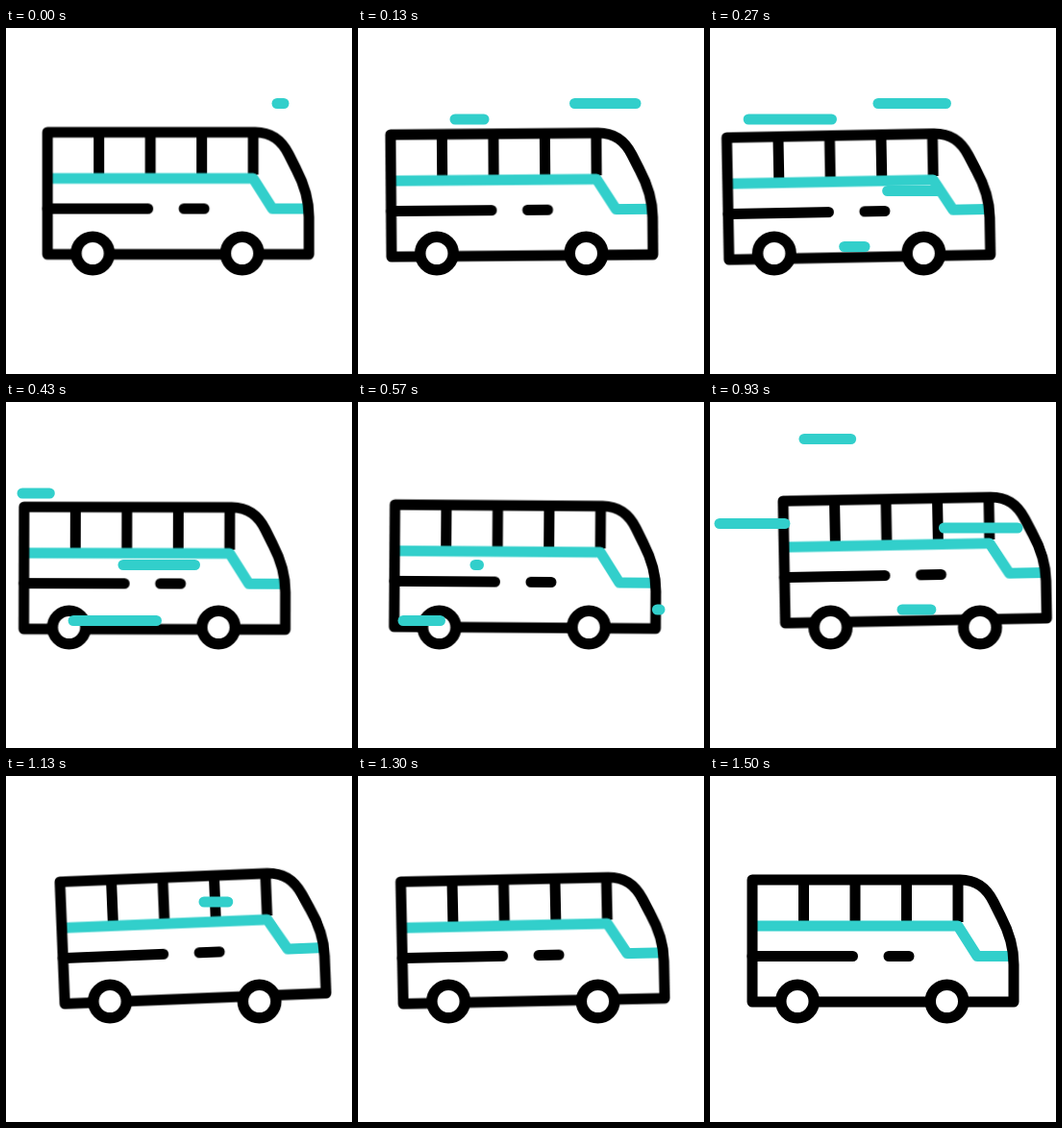
Recreate the animation shown at these times as an HTML page. Size 360 by 360 pixels, loop 1.67 s.

```html
<!DOCTYPE html>
<html lang="en">
<head>
<meta charset="utf-8">
<title>Bus</title>
<style>
  html, body { margin: 0; width: 100%; height: 100%; overflow: hidden; background: #fff; }
  svg { display: block; width: 100vw; height: 100vh; }
  svg * { animation-duration: 1670ms; animation-iteration-count: infinite; }

  :root {
    --smooth: cubic-bezier(.333, 0, .667, 1);
    --in: cubic-bezier(.4, 0, .7, .7);
    --out: cubic-bezier(.3, .3, .6, 1);
  }

  .line { fill: none; stroke: #000; stroke-width: 11; stroke-linecap: round; stroke-linejoin: round; }
  .teal { stroke: #32cfcb; }
  .butt { stroke-linecap: butt; }
  .wheel { fill: #fff; stroke: #000; stroke-width: 11.5; }

  .drive { animation-name: drive; animation-timing-function: var(--smooth); }
  @keyframes drive {
    0% { transform: translateX(-.8px); }
    21.6% { transform: translateX(-28.5px); }
    53.3% { transform: translateX(35px); animation-timing-function: cubic-bezier(.33, 0, .5, 1); }
    85.9%, 100% { transform: translateX(0); }
  }

  .bounce { animation-name: bounce; animation-timing-function: var(--smooth); }
  @keyframes bounce {
    0% { transform: translateY(.5px); }
    16.2% { transform: translateY(3.5px); }
    34.1% { transform: translateY(-.2px); }
    46.1% { transform: translateY(3.5px); }
    55.7% { transform: translateY(-7.5px); animation-timing-function: var(--in); }
    67.7% { transform: translateY(-3.5px); animation-timing-function: var(--out); }
    89.8%, 100% { transform: translateY(0); }
  }

  .tilt { transform-origin: 180px 235px; animation-name: tilt; animation-timing-function: var(--smooth); }
  @keyframes tilt {
    0% { transform: rotate(0deg); }
    17% { transform: rotate(-1.08deg); animation-timing-function: var(--in); }
    34.1% { transform: rotate(.4deg); animation-timing-function: var(--out); }
    46.1% { transform: rotate(1.47deg); animation-timing-function: var(--in); }
    55.7% { transform: rotate(-1.06deg); animation-timing-function: var(--out); }
    66.5% { transform: rotate(-2.35deg); }
    89.8%, 100% { transform: rotate(0deg); }
  }

  /* Each streak grows from its right end, then its tail catches up. */
  .wind path {
    animation-name: streak;
    animation-timing-function: linear;
    animation-delay: calc(var(--t) * 1ms - 1670ms);
  }
  @keyframes streak {
    0% { stroke-dasharray: 0px 300px; stroke-dashoffset: 0px; opacity: 1; }
    11.98% { stroke-dasharray: 87px 300px; stroke-dashoffset: 0px; }
    15.69% { stroke-dasharray: 82.6px 300px; stroke-dashoffset: -31.4px; }
    25.44% { stroke-dasharray: 0px 300px; stroke-dashoffset: -114px; opacity: 1; }
    25.45%, 100% { stroke-dasharray: 0px 300px; stroke-dashoffset: -114px; opacity: 0; }
  }

  .wind { animation-name: calm; animation-timing-function: step-end; }
  @keyframes calm {
    0% { opacity: 1; }
    90%, 100% { opacity: 0; }
  }
</style>
</head>
<body>
<svg viewBox="0 0 360 360">
  <g class="drive">
    <g class="bounce">
      <g class="tilt">
        <path class="line butt" d="M97.5 108V152M151 108V152M204.5 108V152M258 108V152"/>
        <path class="line teal butt" d="M46 156H258L278 187.5H314"/>
        <path class="line" d="M44 187.5H148.5M186 187.5H207"/>
        <path class="line" d="M44 108H260C278 108 288 117 295 131L303 147C312 164 316 180 316 196V235H44Z"/>
      </g>
    </g>
    <circle class="wheel" cx="91" cy="234.5" r="17.25"/>
    <circle class="wheel" cx="246.5" cy="234.5" r="17.25"/>
  </g>
  <g class="wind">
    <path class="line teal" d="M289 78.5h-114" style="--t:-15"/>
    <path class="line teal" d="M131 95h-114" style="--t:62"/>
    <path class="line teal" d="M236 169.5h-114" style="--t:153"/>
    <path class="line teal" d="M161 227.5h-114" style="--t:222"/>
    <path class="line teal" d="M314 216h-114" style="--t:565"/>
    <path class="line teal" d="M212 38.5h-114" style="--t:602"/>
    <path class="line teal" d="M124 126.5h-114" style="--t:640"/>
    <path class="line teal" d="M320 131h-114" style="--t:755"/>
  </g>
</svg>
</body>
</html>
```
